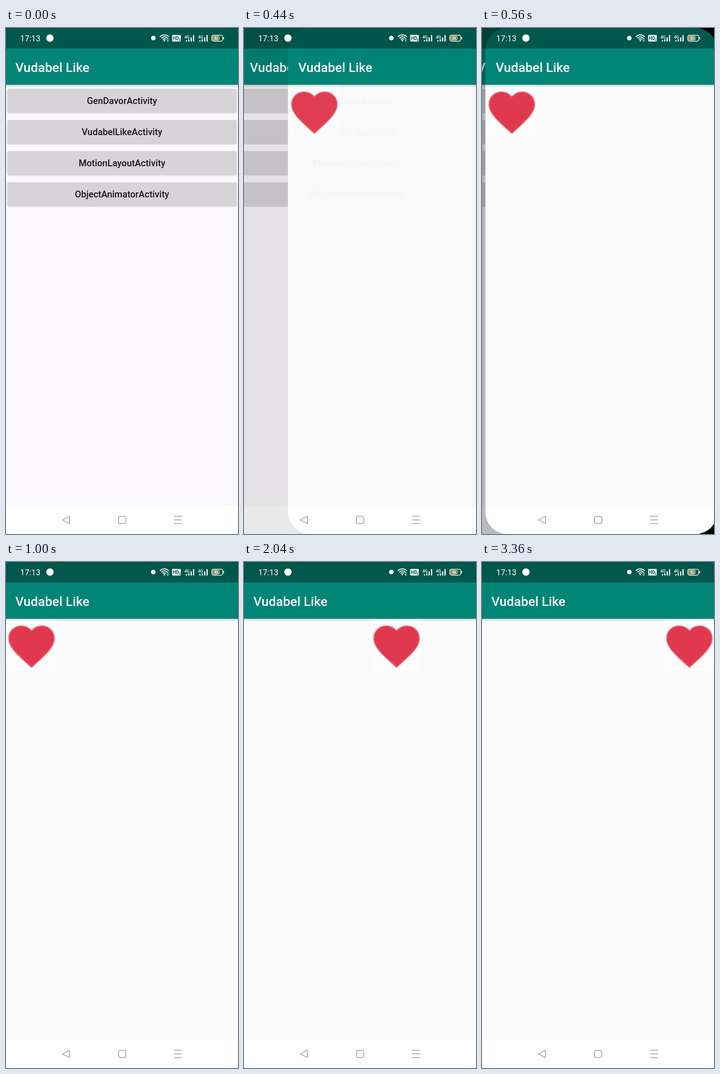
Recreate the animation shown at these times as an HTML page with a canvas. Size 507x1105 px, loop 3.44 s.

```html
<!DOCTYPE html>
<html lang="en">
<head>
<meta charset="utf-8">
<title>Vudabel Like</title>
<style>
html, body { margin: 0; width: 100%; height: 100%; overflow: hidden; background: #000; }
canvas { display: block; width: 100vw; height: 100vh; }
</style>
</head>
<body>
<canvas id="stage" width="507" height="1105"></canvas>
<script>
const W = 507, H = 1105, LOOP = 3440, STEP = 40;
const STATUS_H = 44.8, BAR_BOTTOM = 124, NAV_TOP = 1043;
const FONT = 'Roboto, "Noto Sans", sans-serif';
const SLIDE = { start: 260, length: 380, power: 2.56, end: 800, radius: 48 };
const MOVE = { start: 1851, length: 300, distance: 397.5 };
const LABELS = ['GenDavorActivity', 'VudabelLikeActivity', 'MotionLayoutActivity', 'ObjectAnimatorActivity'];

const ctx = document.getElementById('stage').getContext('2d');
const heart = new Path2D('M12 21.35l-1.45-1.32C5.4 15.36 2 12.28 2 8.5 2 5.42 4.42 3 7.5 3c1.74 0 3.41.81 4.5 2.09C13.09 3.81 14.76 3 16.5 3 19.58 3 22 5.42 22 8.5c0 3.78-3.4 6.86-8.55 11.54z');

const clamp = v => Math.max(0, Math.min(1, v));

function layer(paint) {
  const c = document.createElement('canvas');
  c.width = W;
  c.height = H;
  paint(c.getContext('2d'));
  return c;
}

function rect(g, x, y, w, h, color) {
  g.fillStyle = color;
  g.fillRect(x, y, w, h);
}

function round(g, x, y, w, h, r) {
  g.beginPath();
  g.roundRect(x, y, w, h, r);
}

function disc(g, x, y, r) {
  g.beginPath();
  g.arc(x, y, r, 0, Math.PI * 2);
  g.fill();
}

function text(g, str, x, y, size, weight, color, align = 'left') {
  g.font = `${weight} ${size}px ${FONT}`;
  g.textAlign = align;
  g.fillStyle = color;
  g.fillText(str, x, y);
}

function line(g, ...pts) {
  g.beginPath();
  for (let i = 0; i < pts.length; i += 2) g.lineTo(pts[i], pts[i + 1]);
  g.stroke();
}

// App bar, backdrop and navigation strip shared by both screens
function page(g, back) {
  rect(g, 0, 0, W, H, back);
  const shade = g.createLinearGradient(0, BAR_BOTTOM, 0, BAR_BOTTOM + 6);
  shade.addColorStop(0, 'rgba(0,50,40,.18)');
  shade.addColorStop(1, 'rgba(0,0,0,0)');
  rect(g, 0, BAR_BOTTOM, W, 6, shade);
  rect(g, 0, 0, W, BAR_BOTTOM, '#008577');
  rect(g, 0, 0, W, STATUS_H, '#00574b');
  text(g, 'Vudabel Like', 20.5, 95.5, 28.2, 500, '#fff');
  rect(g, 0, NAV_TOP, W, H - NAV_TOP, '#fff');
}

const menu = layer(g => {
  page(g, '#faf8fc');
  LABELS.forEach((label, i) => {
    const y = 133 + i * 68;
    g.save();
    g.shadowColor = 'rgba(0,0,0,.22)';
    g.shadowBlur = 3;
    g.shadowOffsetY = 1.5;
    g.fillStyle = '#d6d4d7';
    round(g, 3.3, y, 500.5, 51, 2.5);
    g.fill();
    g.restore();
    text(g, label, 253.5, y + 33, 19.9, 500, '#18171a', 'center');
  });
});

const blank = layer(g => page(g, '#fafafa'));

// The picture is soft at its edges, as if enlarged
const HEART_PAD = 4;
const heartPic = layer(g => {
  g.filter = 'blur(0.8px)';
  g.translate(HEART_PAD + 5.5, HEART_PAD + 139);
  g.scale(5.03, 5.01);
  g.translate(-2, -3);
  g.fillStyle = '#e0394f';
  g.fill(heart);
});

function signal(g, x) {
  text(g, '4G', x, 22.5, 9, 500, '#fff');
  [3, 5, 9, 14].forEach((h, i) => rect(g, x + 3 + i * 5.2, 29.5 - h, 2.6, h, '#fff'));
}

const system = layer(g => {
  text(g, '17:13', 31, 28.5, 17.8, 400, '#fff');
  g.fillStyle = '#fff';
  disc(g, 96, 22, 8);
  disc(g, 322, 22, 5);

  g.strokeStyle = '#fff';
  g.lineWidth = 2;
  [4.5, 8.8, 13].forEach(r => {
    g.beginPath();
    g.arc(346, 28, r, -Math.PI * 0.77, -Math.PI * 0.23);
    g.stroke();
  });
  g.fillStyle = '#fff';
  disc(g, 346, 27.5, 1.8);
  g.lineWidth = 1.2;
  line(g, 351.5, 25, 353.5, 23, 355.5, 25);
  line(g, 351.5, 27, 353.5, 29, 355.5, 27);

  g.fillStyle = '#fff';
  round(g, 363, 15, 19, 14.5, 2);
  g.fill();
  text(g, 'HD', 364.5, 26.3, 10, 700, '#00574b');
  text(g, '2', 377.5, 28, 6.5, 700, '#00574b');

  signal(g, 390);
  signal(g, 419.5);

  round(g, 451, 17, 13.5, 10.5, 2);
  g.fillStyle = '#a69c68';
  g.fill();
  g.lineWidth = 1.5;
  round(g, 449.7, 15.7, 24, 13, 4);
  g.stroke();
  rect(g, 474.6, 20, 1.8, 4.5, '#fff');
  text(g, '60', 461.7, 26, 10.5, 400, '#fff', 'center');

  g.strokeStyle = '#979797';
  g.lineWidth = 1.5;
  g.lineJoin = 'round';
  g.beginPath();
  g.moveTo(123.5, 1074.3);
  g.lineTo(138.8, 1066.2);
  g.lineTo(138.8, 1082.3);
  g.closePath();
  g.stroke();
  round(g, 246, 1066.4, 15.8, 15.8, 3.5);
  g.stroke();
  [1066.3, 1074.3, 1082.3].forEach(y => line(g, 367, y, 384.5, y));
});

function drawHeart(x) {
  rect(ctx, x - 0.5, 125, 111.5, 113, 'rgba(255,255,255,.25)');
  rect(ctx, x - 0.5, 124, 111.5, 2, 'rgba(190,230,222,.3)');
  ctx.drawImage(heartPic, x - HEART_PAD, -HEART_PAD);
}

function drawOpening(t) {
  const k = Math.max(0, Math.min(1.5, (t - 320) / 240));
  const shift = -31 * k * k;
  rect(ctx, 0, 0, W, H, '#000');
  ctx.drawImage(menu, shift, 0);
  rect(ctx, 0, 0, W, H, `rgba(0,0,0,${0.27 * k ** 1.65})`);

  const p = clamp((t - SLIDE.start) / SLIDE.length);
  if (p === 0) return;
  const x = W * (1 - p) ** SLIDE.power;
  ctx.save();
  round(ctx, x - 2, 0, W, H, SLIDE.radius);
  ctx.clip();
  ctx.globalAlpha = clamp((t - SLIDE.start) / 184);
  ctx.drawImage(blank, x, 0);
  ctx.drawImage(blank, 0, 0, 2, H, x - 2, 0, 2, H);
  drawHeart(x);
  ctx.restore();
}

function draw(t) {
  if (t < SLIDE.end) {
    drawOpening(t);
  } else {
    const p = clamp((t - MOVE.start) / MOVE.length);
    ctx.drawImage(blank, 0, 0);
    drawHeart(MOVE.distance * (1 - Math.cos(Math.PI * p)) / 2);
  }
  ctx.drawImage(system, 0, 0);
}

const begin = performance.now();
function tick() {
  const t = (performance.now() - begin) % LOOP;
  draw(Math.floor(t / STEP) * STEP);
  requestAnimationFrame(tick);
}
tick();
</script>
</body>
</html>
```
